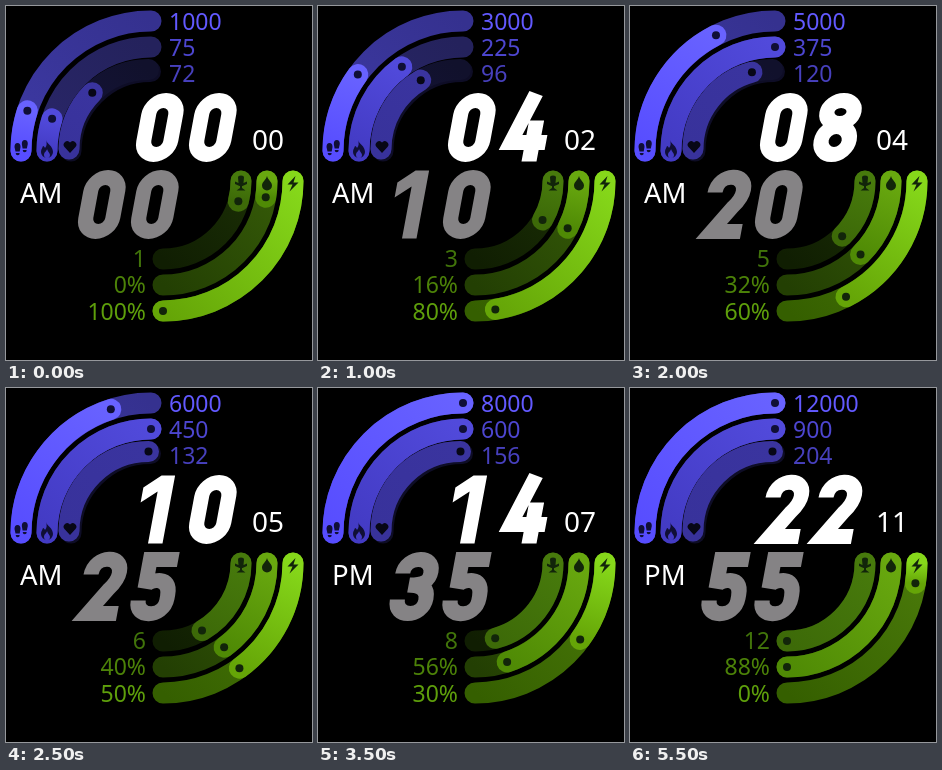
These frames come from a looping animation (306 px wide and 354 px high, 6000 ms). An HTML page:

```html
<!DOCTYPE html>
<html lang="en">
<head>
<meta charset="utf-8">
<title>Watch face</title>
<style>
html, body { margin: 0; width: 100%; height: 100%; overflow: hidden; background: #000; }
svg { display: block; font-family: "Noto Sans", "Open Sans", sans-serif; font-weight: 500; }
.ring { fill: none; stroke-width: 21; stroke-linecap: round; }
.digit { fill: none; stroke-width: 15; }
</style>
</head>
<body>
<svg id="face" width="306" height="354" viewBox="0 0 306 354"></svg>
<script>
const face = document.getElementById('face');

function set(el, attrs) {
  for (const key in attrs) el.setAttribute(key, attrs[key]);
  return el;
}
const add = (tag, attrs, parent = face) =>
  parent.appendChild(set(document.createElementNS('http://www.w3.org/2000/svg', tag), attrs));

// Upper rings run clockwise from the left, lower ones clockwise from the right.
function ringPoint(r, deg) {
  const a = deg * Math.PI / 180, s = r.upper ? -1 : 1;
  return [r.cx + s * r.r * Math.cos(a), r.cy + s * r.r * Math.sin(a)];
}
const arc = (r, deg) => `M${ringPoint(r, 0)}A${r.r} ${r.r} 0 0 1 ${ringPoint(r, deg)}`;

// A ring stroke whose gradient runs from its start to its head.
function band(id, [from, to]) {
  const shade = add('linearGradient', { id, gradientUnits: 'userSpaceOnUse' });
  add('stop', { offset: 0, 'stop-color': from }, shade);
  add('stop', { offset: 1, 'stop-color': to }, shade);
  const path = add('path', { class: 'ring', stroke: `url(#${id})` });
  return (r, deg) => {
    const [x1, y1] = ringPoint(r, 0), [x2, y2] = ringPoint(r, deg);
    set(shade, { x1, y1, x2, y2 });
    set(path, { d: arc(r, deg) });
  };
}

const text = (x, y, size, fill, anchor = 'start') =>
  add('text', { x, y, fill, 'font-size': size, 'text-anchor': anchor });

const navy = '#100f36', night = '#070716', moss = '#12250a';

// level: filled steps; steps: steps in the whole quarter turn
const rings = [
  { upper: true, cx: 145, cy: 145, r: 130, steps: 10, track: ['#3d39a3', '#35318f'], fill: ['#574dff', '#6862ff'],
    ink: '#6259ff', mark: navy, y: 24, level: k => (k + 1) / 8 * 10, label: k => 1000 * (k + 1) },
  { upper: true, cx: 145, cy: 145, r: 104, steps: 10, track: ['#292668', '#24225c'], fill: ['#433bc4', '#514adb'],
    ink: '#4d46d0', mark: navy, y: 50, level: k => 75 * (k + 1) / 40, label: k => 75 * (k + 1) },
  { upper: true, cx: 142.5, cy: 143, r: 79.5, steps: 6, track: ['#15143a', '#11112c'], fill: ['#38329b', '#3a349f'],
    ink: '#4740bd', mark: night, y: 76, level: k => (72 + 12 * k) / 25, label: k => 72 + 12 * k, shadow: true },
  { cx: 157, cy: 175, r: 78, steps: 6, track: ['#1a2e05', '#101e02'], fill: ['#477a0c', '#3d6a08'],
    ink: '#41740a', mark: moss, y: 261, level: k => (k + 1) / 2, label: k => k + 1 },
  { cx: 157, cy: 175, r: 104, steps: 10, track: ['#355a08', '#233f03'], fill: ['#68a80f', '#4f8a05'],
    ink: '#4c8208', mark: moss, y: 287, level: k => k, label: k => 8 * k + '%' },
  { cx: 157, cy: 175, r: 130, steps: 10, track: ['#4a7a0a', '#355f00'], fill: ['#86d81a', '#65a507'],
    ink: '#5e9f0b', mark: moss, y: 314, level: k => 10 - k, label: k => Math.max(0, 100 - 10 * k) + '%' }
];

rings.forEach((r, i) => {
  if (r.shadow) add('path', { class: 'ring', d: arc({ ...r, cx: 144.5, cy: 145 }, 90), stroke: '#0e0d26' });
  band('track' + i, r.track)(r, 90);
  r.bar = band('fill' + i, r.fill);
  r.dot = add('circle', { r: 4, fill: r.mark });
  r.text = r.upper ? text(163, r.y, 23, r.ink) : text(140, r.y, 23, r.ink, 'end');
});

// Icons: footprints, flame, heart, seat, drop, bolt
const icon = (d, fill) => add('path', { d, fill, 'fill-rule': 'evenodd' });
icon('M8.500 141a3 4 0 0 1 6 0l-.800 4.500h-4.200zM9.700 147h4a2 2.300 0 0 1-4 0z'
  + 'M15.800 138a3 4 0 0 1 6 0l-1 4.500h-4.200zM16.700 144h4a2 2.300 0 0 1-4 0z', navy);
icon('M40 134c1 4 7 6 7 12a6 6 0 0 1-12 0c0-3 1.500-4 2-6 1 0 1.500 1 2 2 2-2 2-5 1-8z'
  + 'M41 143c0 2-3 3-3 6a3 3 0 0 0 6 0c0-2-2-3-3-6z', navy);
icon('M64 147l-5.500-6a3.400 3.400 0 0 1 5.500-4.500a3.400 3.400 0 0 1 5.500 4.500z', night);
icon('M232 171.500a3 2 0 0 1 6 0l-.500 5.500 3.500-1.500v2.500l-4.500 2h-.500v2l3.500 2.500h-9l3.500-2.500v-2h-.500l-4.500-2v-2.500l3.500 1.500z', moss);
icon('M261 170c1 4 5 6 5 9.500a5 5 0 0 1-10 0c0-3.500 4-5.500 5-9.500z', moss);
icon('M289.500 170l-8 8.500h5l-3 7 9-9h-5z', moss);

const oval = (y, rx, ry) => `M${21.3 - rx} ${y}a${rx} ${ry} 0 1 1 ${2 * rx} 0a${rx} ${ry} 0 1 1 ${-2 * rx} 0z`;
const glyphs = {
  0: 'M7 -47.500a13.500 13.500 0 0 1 27 0v27a13.500 13.500 0 0 1 -27 0z',
  2: 'M7.500 -46C7.500 -66 35.500 -66 35.500 -48C35.500 -41 32 -36 28 -31.500L11 -7H41',
  3: 'M7 -47C7 -65.500 35 -65.500 35 -48C35 -39 29 -35.500 15 -35.500C30 -35.500 35 -30 35 -21C35 -2.300 6.500 -2.300 6.500 -21',
  4: 'M25.500 -68L9 -19H44.500M31 -41V0',
  5: 'M39 -61H11V-33C14 -42 35 -45 35 -25V-21C35 -2.300 6.500 -2.300 6.500 -20',
  6: oval(-21, 14, 14) + 'M27.500 -68L9 -27',
  8: oval(-49.5, 13.5, 11.5) + oval(-21, 14, 14)
};
// The numeral one is a solid outline, the others are strokes.
const one = 'M15 0V-52L0 -41V-56L16 -68H29.500V0z';

function bigNumber(x, y, color) {
  const cells = [0, 53].map(dx => add('path', { class: 'digit', transform: `translate(${x + dx} ${y}) skewX(-10.5)` }));
  return value => cells.forEach((cell, i) => {
    const solid = value[i] === '1';
    set(cell, { d: solid ? one : glyphs[value[i]] });
    cell.style.fill = solid ? color : 'none';
    cell.style.stroke = solid ? 'none' : color;
  });
}

const setHours = bigNumber(127, 155.5, '#fff');
const setMinutes = bigNumber(69, 232.5, '#858385');
const half = text(14, 196.5, 27.5, '#fff');
const seconds = text(246, 144, 28, '#fff');
const pad = n => String(n).padStart(2, '0');

function show(k) {
  setHours(pad(2 * k));
  setMinutes(pad(5 * k));
  seconds.textContent = pad(k);
  half.textContent = k < 6 ? 'AM' : 'PM';
  for (const r of rings) {
    const level = Math.min(r.steps, Math.max(0, Math.floor(r.level(k))) + 1);
    const deg = 90 * level / r.steps, [cx, cy] = ringPoint(r, deg);
    r.bar(r, deg);
    set(r.dot, { cx, cy });
    r.text.textContent = r.label(k);
  }
}

let shown = -1;
function tick() {
  const k = Math.floor(performance.now() % 6000 / 500);
  if (k !== shown) show(shown = k);
  requestAnimationFrame(tick);
}
tick();
</script>
</body>
</html>
```
